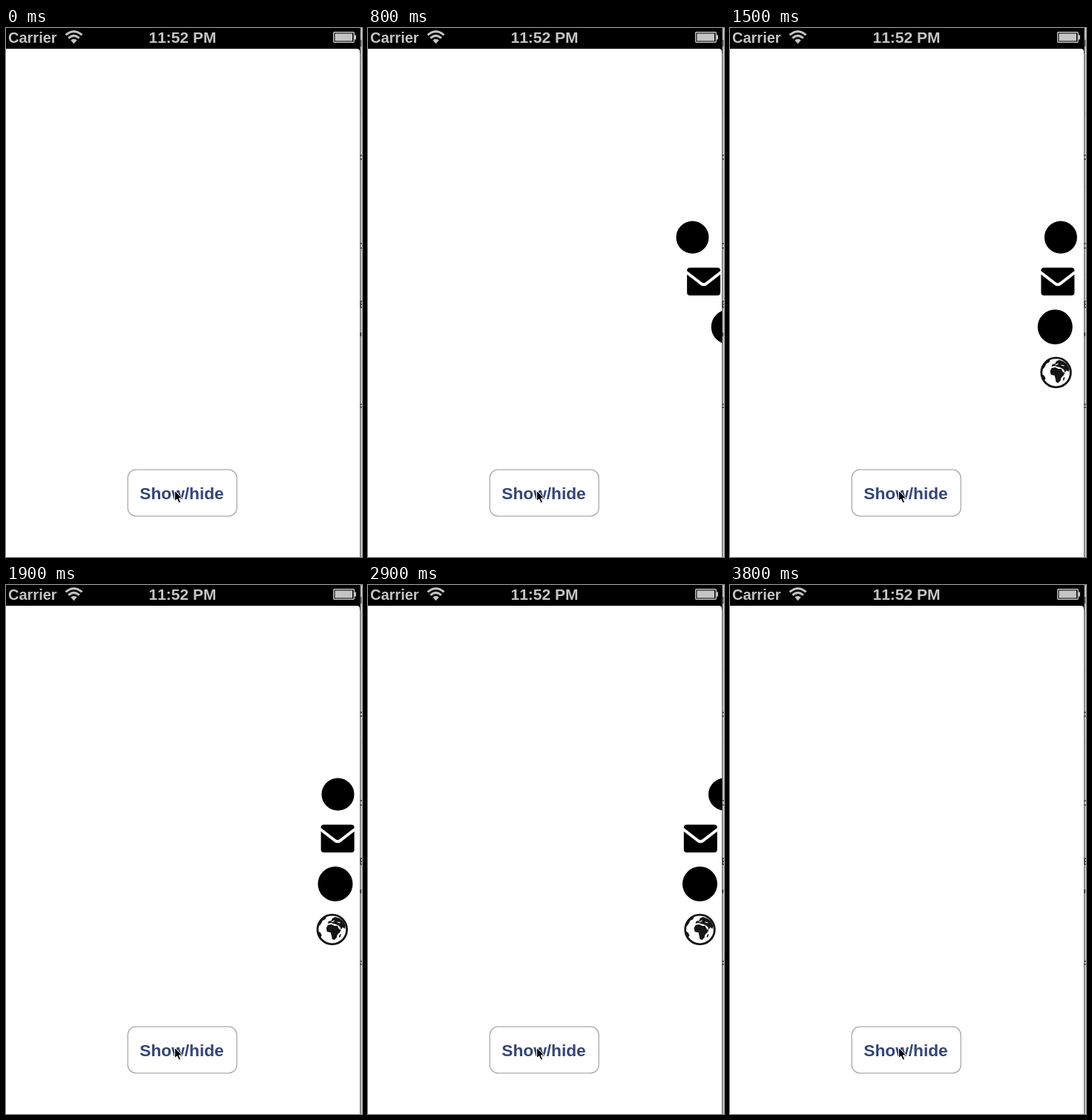
Recreate the animation shown at these times as an HTML page. Size 480x714 px, loop 3900 ms.

```html
<!DOCTYPE html>
<html lang="en">
<head>
<meta charset="utf-8">
<title>Show/hide menu</title>
<style>
html, body { margin: 0; width: 100%; height: 100%; overflow: hidden; background: #fff; }
svg { display: block; }
text { font-family: "Liberation Sans", Arial, sans-serif; font-weight: bold; font-kerning: none; }
</style>
</head>
<body>
<svg width="480" height="714" viewBox="0 0 480 714">
  <defs>
    <clipPath id="screen"><rect width="477.5" height="714"/></clipPath>
  </defs>

  <!-- window behind the phone -->
  <rect x="476" width="4" height="714" fill="#d6d6d6"/>
  <rect x="477" width="1.6" height="714" fill="#777"/>
  <g fill="none" stroke="#444" stroke-width="1.6">
    <path d="M478.5 16v9M477 172h3M477 177h3M477 291h3M477 297h3M477 369h3M477 373h3M477 377h3M478 369v8M477 508h3M477 512h3"/>
    <path d="M478 411v5" stroke-width="2.5"/>
  </g>
  <path d="M478.5 40h1.5M478.5 115h1.5M478.5 214h1.5M478.5 333h1.5M478.5 452h1.5" stroke="#aaa"/>

  <!-- status bar and page -->
  <rect width="477.5" height="34" fill="#000"/>
  <path d="M0 28H473Q477 28 477 32V714H0Z" fill="#fff"/>
  <g fill="#c4c4c4">
    <text x="3" y="20" font-size="20">Carrier</text>
    <text x="238" y="20" font-size="21" text-anchor="middle">11:52 PM</text>
    <path d="M91.5 21.2l-4.2-4.6q4.2-3.6 8.4 0z"/>
    <rect x="443.5" y="7.5" width="23.5" height="10"/>
    <path d="M470 9.5h2v6h-2z"/>
  </g>
  <g fill="none" stroke="#c4c4c4">
    <path d="M84.2 13.6q7.3-6.4 14.6 0M80.5 9.4q11-9.4 22 0" stroke-width="3"/>
    <rect x="441.7" y="5.7" width="27.6" height="13.6" rx="1" stroke-width="1.4"/>
  </g>

  <g clip-path="url(#screen)">
    <g class="icon"><circle cy="282.5" r="22"/></g>
    <g class="icon">
      <rect x="-22.5" y="323.5" width="45" height="37.5" rx="4"/>
      <path d="M-23.5 329.5L-3.5 345Q0 347.5 3.5 345L23.5 329.5" fill="none" stroke="#fff" stroke-width="4"/>
    </g>
    <g class="icon"><circle cy="403.5" r="23.5"/></g>
    <g class="icon">
      <g transform="translate(0 465)" fill="#151515">
        <circle r="19.8" fill="#fff" stroke="#151515" stroke-width="2.8"/>
        <path d="M-8-2L-6-6-1-7 3-5 7-5 9-1 12 1 10 4 7 7 6 11 3 14 0 13-1 8-2 4-7 3Z"/>
        <path d="M-6-8L-5-11-1-12 0-15 4-17 10-15 15-11 18-5 17-1 14-3 12 0 9-5 5-7 1-8-2-9Z"/>
        <path d="M-19-8L-14-15-8-18-9-14-13-12-15-8-17-5ZM-20 2L-16 4-14 8-16 11-18 8ZM10 7l2-1-1 4-2 1Z"/>
        <path d="M-1-10l4-2M7-10l4 1M8-5l3 3" stroke="#fff" stroke-width="1.2"/>
      </g>
    </g>
  </g>

  <rect x="164.2" y="596.2" width="147" height="62.6" rx="11" fill="#fff" stroke="#aaa" stroke-width="1.3"/>
  <text x="237" y="636" font-size="22.7" text-anchor="middle" fill="#33457a">Show/hide</text>
  <path d="M227.5 624.5v14.2l3.2-2.9 2.4 5.4 2.5-1.1-2.4-5.3h4.4z" fill="#000" stroke="#fff" stroke-width="1"/>
</svg>
<script>
const LOOP = 3900, STEP = 100;
const REST = 446.5, AWAY = 56, OVER = -9, SETTLED = 1;
const STAGGER = 0.27, SLIDE_END = 0.78, SETTLE_END = 1.75;
const HIDE_AT = 2.58, HIDE_END = 2.99;
const icons = document.querySelectorAll(".icon");

const progress = (t, from, to) => Math.min(1, Math.max(0, (t - from) / (to - from)));
const easeInOut = p => (1 - Math.cos(Math.PI * p)) / 2;
const easeIn = p => p * p;

// Slide in past the resting place, settle back, then slide out.
function offset(t) {
  return AWAY
    + (OVER - AWAY) * easeInOut(progress(t, 0, SLIDE_END))
    + (SETTLED - OVER) * easeInOut(progress(t, SLIDE_END, SETTLE_END))
    + (AWAY - SETTLED) * easeIn(progress(t, HIDE_AT, HIDE_END));
}

function draw(ms) {
  const t = Math.floor((ms % LOOP) / STEP) * STEP / 1000;
  icons.forEach((icon, i) => {
    const x = REST + offset(t - i * STAGGER);
    icon.setAttribute("transform", `translate(${x.toFixed(2)} 0)`);
  });
}

let start;
function tick(now) {
  start ??= now;
  draw(now - start);
  requestAnimationFrame(tick);
}
draw(0);
requestAnimationFrame(tick);
</script>
</body>
</html>
```
